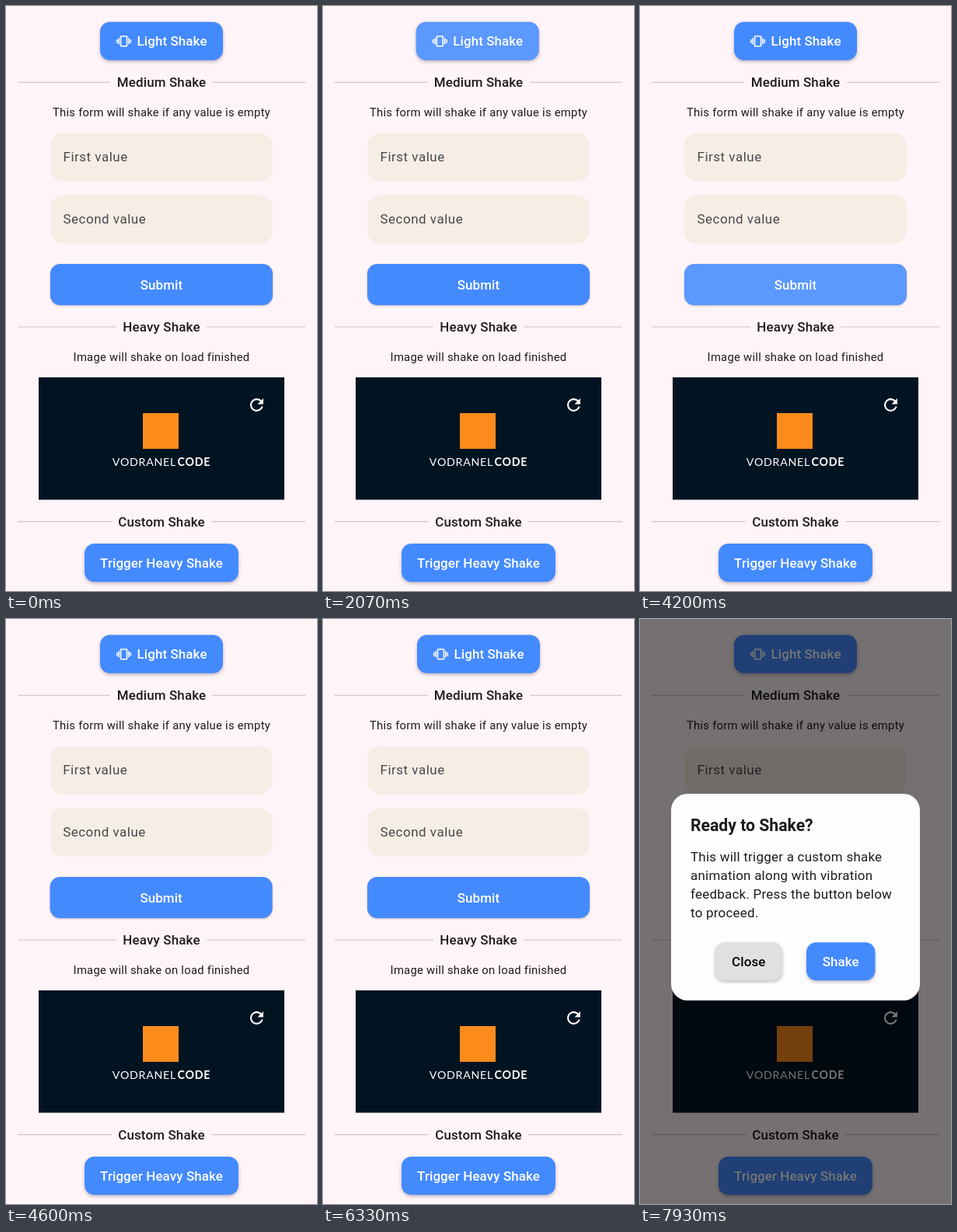
An HTML page for the animation above (8 s loop, 400 by 753 pixels).

```html
<!DOCTYPE html>
<html lang="en">
<head>
<meta charset="utf-8">
<title>Shake demo</title>
<style>
  html, body { margin: 0; width: 100%; height: 100%; overflow: hidden; background: #fff4f8; }
  svg { display: block; width: 100vw; height: 100vh; }
  text { font-family: Roboto, "Noto Sans", sans-serif; fill: #1d1b1e; }
  .mid { text-anchor: middle; }
  .title { font-size: 16.93px; font-weight: 500; letter-spacing: .16px; }
  .note { font-size: 14.8px; letter-spacing: .265px; }
  .label { font-size: 16.93px; letter-spacing: .53px; fill: #4a464c; }
  .btn { font-size: 16.93px; font-weight: 500; letter-spacing: .1px; }
  .head { font-size: 21.2px; font-weight: 700; }
  .body { font-size: 16.93px; letter-spacing: .26px; }
  .brand { font-family: Lato, "Open Sans", sans-serif; font-size: 14.2px; letter-spacing: .75px; fill: #fff; }
  .brand tspan { font-weight: 700; }
  .high { filter: drop-shadow(0 2.5px 2px rgba(40, 30, 50, .3)); }
  .low { filter: drop-shadow(0 1.5px 1.2px rgba(40, 30, 50, .3)); }
</style>
</head>
<body>
<svg id="stage" viewBox="0 0 400 753" preserveAspectRatio="none">
  <rect width="400" height="753" fill="#fff4f8"/>
  <g id="sections"></g>
  <text class="note mid" x="200" y="142.2">This form will shake if any value is empty</text>
  <text class="note mid" x="200" y="456.8">Image will shake on load finished</text>
  <g id="light"></g>
  <g id="form"></g>
  <g id="image">
    <rect x="42" y="478" width="316" height="157.5" fill="#021422"/>
    <rect x="176" y="524" width="46" height="46" fill="#fb8c1c"/>
    <text class="brand mid" x="200" y="592">VODRANEL<tspan dx="1.5">CODE</tspan></text>
    <path fill="#fff" transform="translate(309.8 500.8) scale(1.058)" d="M17.65 6.35C16.2 4.9 14.21 4 12 4c-4.42 0-7.99 3.58-7.99 8s3.57 8 7.99 8c3.73 0 6.84-2.55 7.73-6h-2.08c-.82 2.33-3.04 4-5.65 4-3.31 0-6-2.69-6-6s2.69-6 6-6c1.66 0 3.14.69 4.22 1.78L13 11h7V4l-2.35 2.35z"/>
  </g>
  <g id="trigger"></g>
  <rect id="dim" width="400" height="753" opacity="0"/>
  <g id="dialog" opacity="0">
    <rect x="40" y="225" width="320" height="266" rx="21" fill="#fffdfe"/>
    <text class="head" x="65" y="272.6">Ready to Shake?</text>
  </g>
</svg>
<script>
const LOOP = 8000;
const BLUE = '#448aff';
const $ = id => document.getElementById(id);

function add(parent, tag, attrs, content = '') {
  const el = document.createElementNS('http://www.w3.org/2000/svg', tag);
  for (const key in attrs) el.setAttribute(key, attrs[key]);
  el.textContent = content;
  parent.append(el);
  return el;
}

// Returns the white overlay used as press highlight.
function button(parent, x, y, width, height, label, opts = {}) {
  const { fill = BLUE, color = '#fff', shadow = 'high', textX = x + width / 2 } = opts;
  const box = { x, y, width, height, rx: 12.7 };
  add(parent, 'rect', { ...box, fill, class: shadow });
  const glow = add(parent, 'rect', { ...box, fill: '#fff', opacity: 0 });
  add(parent, 'text', { class: 'btn mid', x: textX, y: y + height / 2 + 6, style: `fill:${color}` }, label);
  return glow;
}

function section(y, label, left, right) {
  const lines = `M15 ${y}H${left}M${right} ${y}H385`;
  add($('sections'), 'path', { d: lines, stroke: '#cfc5ca', 'stroke-width': 1.1 });
  add($('sections'), 'text', { class: 'title mid', x: 200, y: y + 6 }, label);
}

function field(y, label) {
  add($('form'), 'rect', { x: 57, y, width: 286, height: 62, rx: 16, fill: '#f6eee5' });
  add($('form'), 'text', { class: 'label', x: 73.5, y: y + 36.6 }, label);
}

section(98.4, 'Medium Shake', 134, 266);
section(413, 'Heavy Shake', 142, 258);
section(663.6, 'Custom Shake', 136, 264);

const lightGlow = button($('light'), 121, 20.5, 158, 49.3, 'Light Shake', { textX: 213.6 });
add($('light'), 'path', {
  fill: '#fff',
  transform: 'translate(142 35.8) scale(.794)',
  d: 'M0 15h2V9H0v6zm3 2h2V7H3v10zm19-8v6h2V9h-2zm-3 8h2V7h-2v10zM16.5 3h-9C6.67 3 6 3.67 6 4.5v15c0 .83.67 1.5 1.5 1.5h9c.83 0 1.5-.67 1.5-1.5v-15c0-.83-.67-1.5-1.5-1.5zM16 19H8V5h8v14z'
});

field(163.5, 'First value');
field(243.5, 'Second value');
const submitGlow = button($('form'), 57, 332, 286, 53, 'Submit', { shadow: 'low' });
const triggerGlow = button($('trigger'), 101, 692, 198, 49.3, 'Trigger Heavy Shake');

[
  'This will trigger a custom shake',
  'animation along with vibration',
  'feedback. Press the button below',
  'to proceed.'
].forEach((line, i) => add($('dialog'), 'text', { class: 'body', x: 65, y: 312 + i * 24.15 }, line));
button($('dialog'), 96.5, 416.3, 86.5, 49, 'Close', { fill: '#e1dfe1', color: '#000' });
button($('dialog'), 214, 416.3, 88.5, 49, 'Shake');

// Linear interpolation through [time, value] steps.
function track(steps, t) {
  if (t <= steps[0][0]) return steps[0][1];
  for (let i = 1; i < steps.length; i++) {
    const [t0, v0] = steps[i - 1], [t1, v1] = steps[i];
    if (t < t1) return v0 + (v1 - v0) * (t - t0) / (t1 - t0);
  }
  return steps[steps.length - 1][1];
}

const shakes = [
  { el: $('light'), start: 2062, end: 2450, size: 3 },
  { el: $('form'), start: 4240, end: 4780, size: 19 },
  { el: $('image'), start: 5730, end: 6310, size: 26 }
];

const glows = [
  { el: lightGlow, steps: [[1640, 0], [1800, .12], [2100, .12], [2300, 0]] },
  { el: submitGlow, steps: [[4040, 0], [4160, .12], [4240, .12], [4450, 0]] },
  { el: triggerGlow, steps: [[7310, 0], [7390, .12], [7430, .12], [7520, 0]] }
];

const opening = [[7440, 0], [7530, .6], [7660, 1]];

function shakeOffset({ start, end, size }, t) {
  const u = (t - start) / (end - start);
  if (u <= 0 || u >= 1) return 0;
  return -size * Math.sin(u * Math.PI * 6) * (1 - u * u);
}

function draw(t) {
  for (const s of shakes) s.el.setAttribute('transform', `translate(${shakeOffset(s, t).toFixed(2)} 0)`);
  for (const g of glows) g.el.setAttribute('opacity', track(g.steps, t));
  const open = track(opening, t);
  $('dim').setAttribute('opacity', open * .54);
  $('dialog').setAttribute('opacity', open);
}

const begin = performance.now();
function tick() {
  draw((performance.now() - begin) % LOOP);
  requestAnimationFrame(tick);
}
tick();
</script>
</body>
</html>
```
